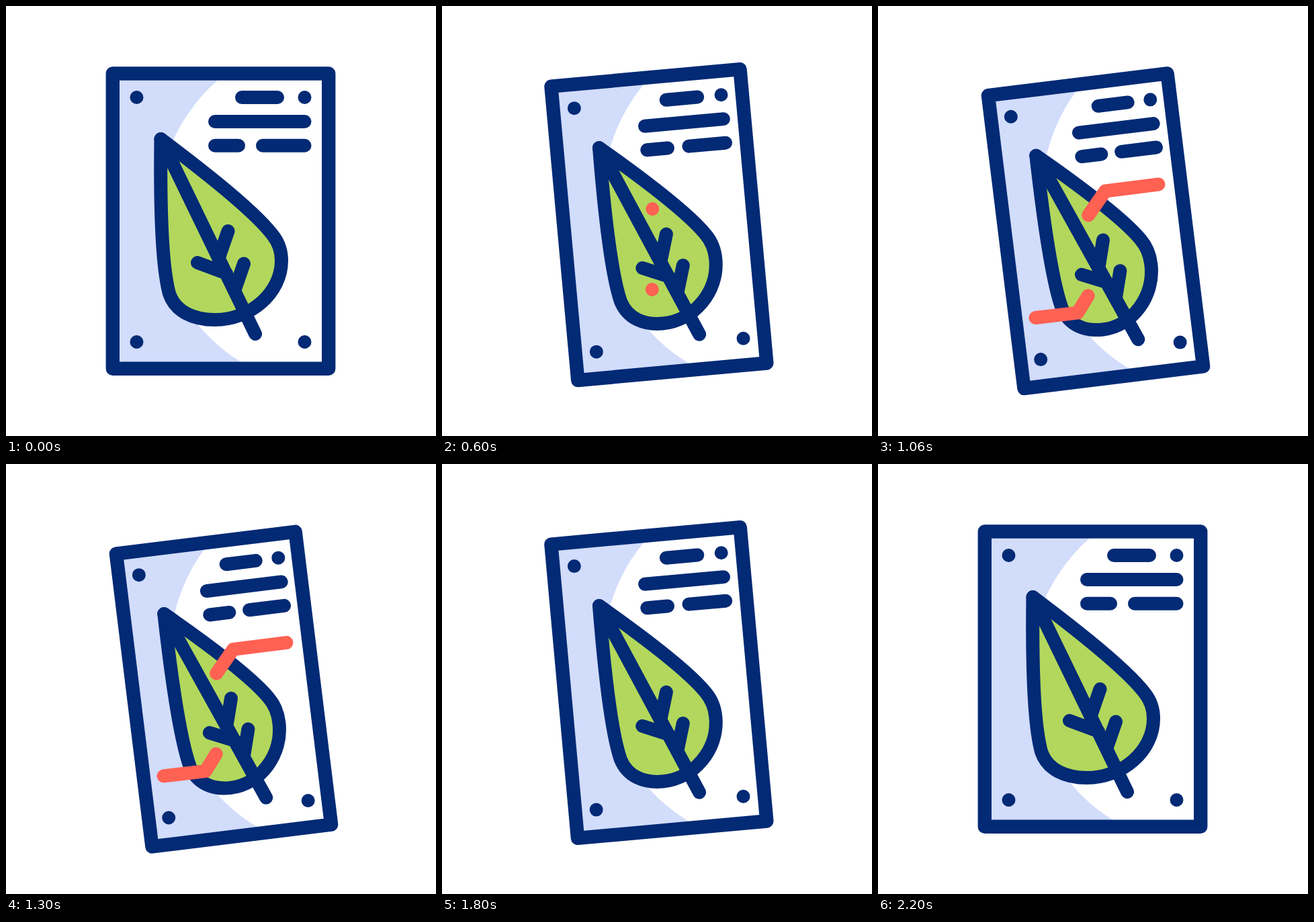
These frames come from a looping animation (640x640 px, 2.4 s). An HTML page:

```html
<!DOCTYPE html>
<html lang="en">
<head>
<meta charset="utf-8">
<title>Leaf poster</title>
<style>
  html, body { margin: 0; width: 100%; height: 100%; overflow: hidden; background: #fff; }
  svg { display: block; }
  path { fill: none; stroke: #022a75; stroke-width: 20; stroke-linecap: round; stroke-linejoin: round; }
  #poster path { vector-effect: non-scaling-stroke; }
  #poster .shade { fill: #d2dcfb; stroke: none; }
  #poster .frame { stroke-width: 20.4; }
  #poster .leaf { fill: #b2d75c; }
  #marks path { stroke: #ff6153; }
</style>
</head>
<body>
<svg width="640" height="640" viewBox="0 0 640 640">
  <g id="poster">
    <path class="shade" d="M158.8 100.5H327.2A261.6 261.6 0 0 0 366.7 539.7H158.8Z"/>
    <path class="frame" d="M158.8 100.5H480.2V539.7H158.8Z"/>
    <!-- pins and text bars -->
    <path d="M194.5 136h0M194.5 500h0M444.5 500h0M444.5 136h0
             M351 136H404M311 172H444.5M311 207.7H346M382 207.7H444.5"/>
    <path class="leaf" d="M230.5 198C229 320 234 395 243 428C252 455 279 467 311 467
             C364 467 410 427 410 379C410 363 405 351 397 341C372 308 304 253 230.5 198Z"/>
    <!-- stem and veins -->
    <path d="M230.5 198L371 488M330.5 335L317 374M285 382L328 398M354 383.5L340 424"/>
  </g>
  <g id="marks">
    <path pathLength="1" d="M313.2 296.6L338.2 260.8L417.5 250.8"/>
    <path pathLength="1" d="M312.7 416.5L297 442L234.5 449.3"/>
  </g>
</svg>
<script>
  const LOOP = 2400;
  const poster = document.getElementById('poster');
  const marks = document.getElementById('marks');

  // Eased progress of t between two times
  function ease(t, from, to) {
    const p = Math.min(1, Math.max(0, (t - from) / (to - from)));
    return p * p * (3 - 2 * p);
  }

  function draw(now) {
    const time = now % LOOP;
    const t = Math.min(time, LOOP - time); // second half mirrors the first
    const turn = ease(t, 200, 800);
    const drop = 15.5 * ease(t, 200, 1200);
    const trim = ease(t, 600, 1000);

    poster.setAttribute('transform',
      `translate(${319.5 + 4.5 * turn} ${320 + drop}) rotate(${-7 * turn}) ` +
      `scale(${1 - 0.164 * turn} 1) translate(-319.5 -320)`);
    marks.setAttribute('transform', `translate(0 ${drop})`);
    marks.setAttribute('visibility', trim > 0 ? 'visible' : 'hidden');
    marks.setAttribute('stroke-dasharray', `${trim} 2`);
  }

  const start = performance.now();
  function tick() {
    draw(performance.now() - start);
    requestAnimationFrame(tick);
  }
  tick();
</script>
</body>
</html>
```
